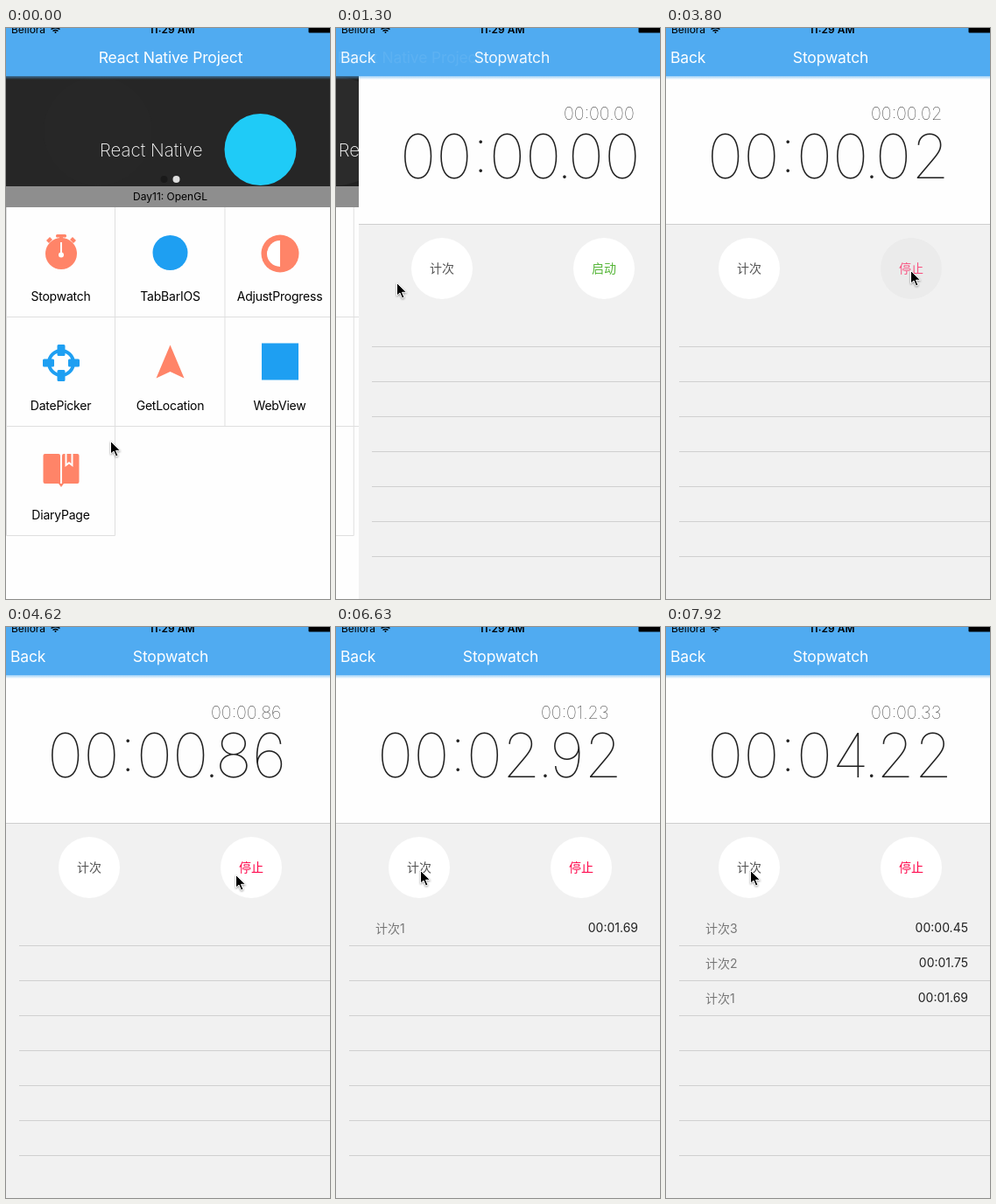
Recreate the animation shown at these times as an HTML page. Size 370 by 653 pixels, loop 8000 ms.

```html
<!DOCTYPE html>
<html lang="en">
<head>
<meta charset="utf-8">
<title>Stopwatch</title>
<style>
  html, body { margin: 0; height: 100%; overflow: hidden; background: #fefefe; }
  svg { display: block; width: 100vw; height: 100vh; font: 14px Inter, "Noto Sans CJK SC", "Noto Sans CJK", sans-serif; }
  .mid { text-anchor: middle; }
  .nav { font-size: 17.5px; fill: #fff; letter-spacing: -.15px; }
  .label { font-size: 14px; letter-spacing: -.23px; }
  .thin { font-weight: 100; fill: #222; }
  .red { fill: #ff8468; }
  .blue { fill: #1e9ff2; }
  #big { font-weight: 140; }
  #cursor { filter: drop-shadow(0 1px 1px #0006); }
</style>
</head>
<body>
<svg viewBox="0 0 370 653">
  <g id="home">
    <rect y="55" width="375" height="598" fill="#fefefe"/>
    <rect id="banner" y="55" width="375" height="150"/>
    <circle id="ghost" cx="105" cy="118" r="62"/>
    <text x="107" y="147" font-size="20.5" font-weight="200" fill="#fff">React Native</text>
    <circle cx="290.5" cy="139" r="41" fill="#1fcbf7"/>
    <circle cx="180.5" cy="173" r="4" fill="#1a1a1a"/>
    <circle cx="194.5" cy="173" r="4" fill="#dedede"/>
    <rect y="181" width="375" height="24" fill="#8e8e8e"/>
    <text class="mid" x="187.5" y="197" font-size="12">Day11: OpenGL</text>
    <rect id="cell" y="205" width="125" height="125" fill="#ebebeb"/>
    <path d="M.5 205V580.5H124.5V205M0 330.5H375M0 455.5H375M250 205V455.5" fill="none" stroke="#dfdfdf"/>
    <g id="watch">
      <g class="red">
        <circle cx="63" cy="258" r="18"/>
        <rect x="57" y="236" width="12" height="3.5" rx="1.5"/>
        <rect x="61" y="237" width="4" height="6"/>
        <path d="M46 243l4-4 3 3-4 4zM80 243l-4-4-3 3 4 4z"/>
      </g>
      <path d="M63 245V259" stroke="#fff" stroke-width="2"/>
      <circle cx="63" cy="259.5" r="3" fill="#fff"/>
    </g>
    <circle class="blue" cx="187.5" cy="257" r="20"/>
    <circle class="red" cx="313" cy="258" r="21.5"/>
    <path d="M313 243a15 15 0 0 0 0 30z" fill="#fff"/>
    <circle cx="63" cy="383" r="14" fill="none" stroke="#1e9ff2" stroke-width="4"/>
    <path d="M60 363.5h6v10h-6zM60 392.5h6v10h-6zM43.5 380h10v6h-10zM72.5 380h10v6h-10z" class="blue" stroke="#1e9ff2" stroke-width="3" stroke-linejoin="round"/>
    <path class="red" d="M187.5 362.5L203.5 400.5L187.5 393L171.5 400.5Z"/>
    <rect class="blue" x="292" y="360.5" width="42" height="42"/>
    <path class="red" d="M44.5 487H60Q62 487 62 489V521H44.5Q42.500 521 42.500 519V489Q42.500 487 44.5 487ZM64 489Q64 487 66 487H67.5V502L72 498.500L76.500 502V487H81.500Q83.500 487 83.500 489V519Q83.500 521 81.500 521H64ZM69.500 487H74.500V498L72 496L69.500 498ZM60 521H66L63 525Z"/>
    <g id="labels"></g>
  </g>

  <g id="page">
    <rect y="55" width="375" height="598" fill="#f1f1f1"/>
    <rect y="55" width="375" height="169" fill="#fefefe"/>
    <path d="M0 224.5H375" stroke="#cfcfcf"/>
    <text class="thin" id="small" x="234" y="104.5" font-size="20"></text>
    <text class="thin" id="big" x="47" y="172" dx="0 0 0 0 0 -4 -4" font-size="70"></text>
    <circle id="lapDisc" cx="95" cy="275" r="35"/>
    <text class="mid" id="lapText" x="95" y="280" fill="#555">计次</text>
    <circle id="runDisc" cx="280" cy="275" r="35"/>
    <text class="mid" id="runText" x="280" y="280"></text>
    <path id="lines" stroke="#d0d0d0"/>
    <g id="rows"></g>
  </g>

  <linearGradient id="shade" x2="0" y2="1">
    <stop stop-color="#50abf1" stop-opacity=".55"/>
    <stop offset="1" stop-color="#50abf1" stop-opacity="0"/>
  </linearGradient>
  <rect y="55" width="375" height="4" fill="url(#shade)"/>
  <rect width="375" height="55" fill="#50abf1"/>
  <text class="nav mid" id="homeTitle" x="188" y="40">React Native Project</text>
  <text class="nav mid" id="pageTitle" x="188" y="40">Stopwatch</text>
  <text class="nav" id="back" x="5" y="40">Back</text>
  <text x="6" y="5.5" font-size="12">Bellora</text>
  <path d="M51.5 1.5Q56.5 -2 61.5 1.5M53.5 3.5Q56.5 1.5 59.5 3.5" fill="none" stroke="#000" stroke-width="1.5"/>
  <circle cx="56.5" cy="5" r="1"/>
  <text class="mid" x="189.5" y="5.5" font-size="12" font-weight="600">11:29 AM</text>
  <rect x="345.5" y="-4" width="25" height="9.5" rx="1"/>
  <path id="cursor" d="M0 0V14.5L3.5 11.5L6 17.5L8.5 16.5L6 10.8H11Z" stroke="#fff"/>
</svg>
<script>
const $ = id => document.getElementById(id);
const set = (id, attrs) => { for (const k in attrs) $(id).setAttribute(k, attrs[k]); };
const move = (id, x, y = 0) => set(id, { transform: `translate(${x} ${y})` });

const LOOP = 8000, TICK = 117.7, PUSH = 1060, START = 3800;
const names = ["Stopwatch", "TabBarIOS", "AdjustProgress", "DatePicker", "GetLocation", "WebView", "DiaryPage"];
// Cursor: time, x, y
const path = [
  [0, 119, 472], [120, 112, 460], [240, 96, 432], [360, 76, 392], [470, 59, 348],
  [590, 51, 314], [710, 59, 297], [830, 69, 291],
  [2010, 80, 289], [2130, 94, 283], [2250, 103, 277], [3080, 190, 277], [3200, 279, 277],
  [4620, 262, 283], [4740, 215, 292], [4860, 160, 291], [4980, 120, 284], [5090, 104, 280], [5210, 96, 278]
];
// Clock: tick, hundredths of a second
const clock = [[0, 2], [14, 169], [24, 292], [35, 422]];
const marks = [169, 344, 389];

$("labels").innerHTML = names.map((s, i) =>
  `<text class="label mid" x="${62.5 + i % 3 * 125}" y="${312 + (i / 3 | 0) * 125}">${s}</text>`).join("");
set("lines", { d: [0, 1, 2, 3, 4, 5, 6].map(i => `M15 ${364.5 + i * 40}H375`).join("") });

const two = n => String(n).padStart(2, "0");
const format = c => `${two(c / 6000 | 0)}:${two((c / 100 | 0) % 60)}.${two(c % 100)}`;

function clockAt(k) {
  const i = Math.max(1, clock.findIndex(p => p[0] >= k));
  const [a, u] = clock[i - 1], [b, v] = clock[i];
  return Math.round(u + (v - u) * (k - a) / (b - a));
}

function press(name, down, color) {
  set(name + "Disc", { fill: down ? "#ebebeb" : "#fff" });
  set(name + "Text", { fill: color, opacity: down ? .65 : 1 });
}

function drawPush(t) {
  const step = PUSH + 120 * Math.floor((t - PUSH) / 120);
  const u = Math.min(1, Math.max(0, (step - PUSH + 3.4) / 500));
  const p = t < PUSH ? 0 : 1 - (1 - u) ** 4;
  const held = t >= PUSH && t < PUSH + 240;
  move("home", -112 * p);
  move("page", 375 * (1 - p));
  move("homeTitle", -112 * p);
  move("pageTitle", 187 * (1 - p));
  set("homeTitle", { opacity: 1 - p });
  set("pageTitle", { opacity: p });
  set("back", { opacity: p });
  set("cell", { opacity: held ? 1 : 0 });
  set("watch", { opacity: held ? .85 : 1 });
  $("labels").firstChild.setAttribute("opacity", held ? .75 : 1);
  set("banner", { fill: t < PUSH ? "#262626" : "#212121" });
  set("ghost", { fill: t < PUSH ? "#272727" : "#2b2b2b" });
}

function drawWatch(t) {
  const running = t >= START;
  const k = Math.min(35, Math.floor((t - START + 5) / TICK));
  const total = running ? clockAt(k) : 0;
  const laps = marks.filter(m => m <= total);
  const last = laps.at(-1) || 0;
  const lapStart = total === last ? laps.at(-2) || 0 : last;
  $("big").textContent = format(total);
  $("small").textContent = format(total - lapStart);
  $("runText").textContent = running ? "停止" : "启动";
  press("run", running && k < 2, running ? "#ff0048" : "#55b537");
  press("lap", last > 0 && total - last < 20, "#555");
  $("rows").innerHTML = laps.map((m, i) => {
    const y = 349 + (laps.length - 1 - i) * 40;
    return `<text x="45" y="${y + 1}" fill="#777">计次${i + 1}</text>` +
      `<text x="345" y="${y}" text-anchor="end" fill="#222">${format(m - (marks[i - 1] || 0))}</text>`;
  }).join("");
}

function draw(now) {
  const t = now % LOOP;
  drawPush(t);
  drawWatch(t);
  const [, x, y] = path.findLast(p => p[0] <= t);
  move("cursor", x + .5, y + .5);
}

const begin = performance.now();
(function frame() {
  draw(performance.now() - begin);
  requestAnimationFrame(frame);
})();
</script>
</body>
</html>
```
